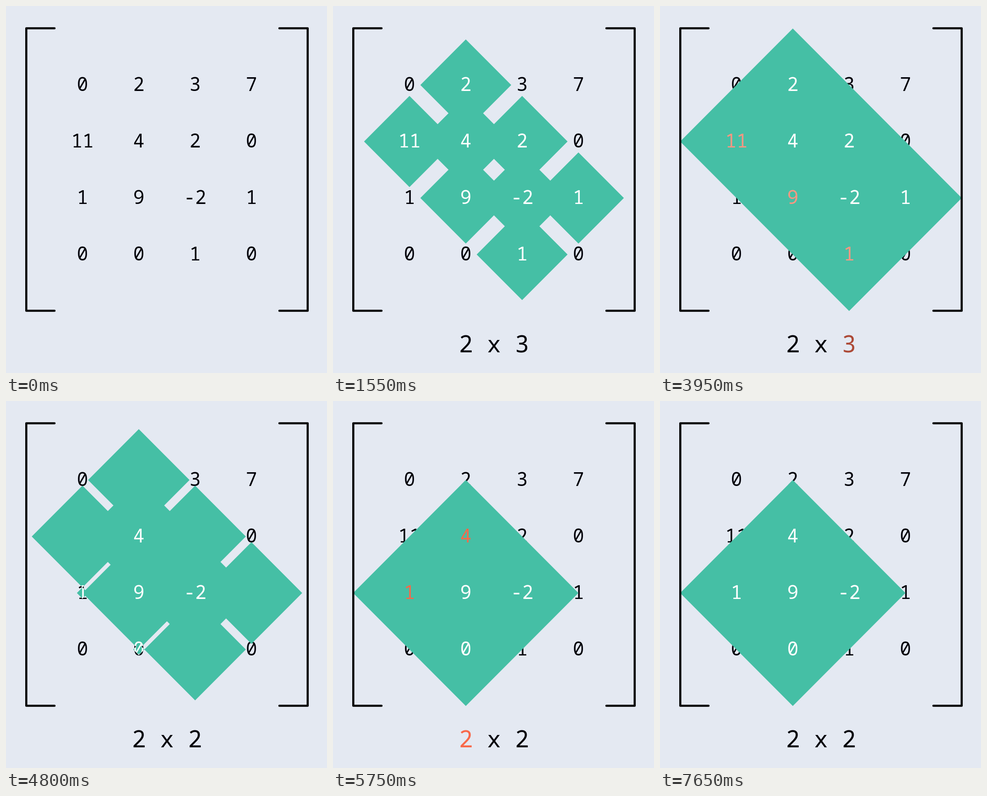
Recreate the animation shown at these times as an HTML page. Size 701x799 px, loop 8000 ms.

```html
<!DOCTYPE html>
<html lang="en">
<head>
<meta charset="utf-8">
<title>Diamond submatrix</title>
<style>
  html, body { margin: 0; width: 100%; height: 100%; overflow: hidden; background: #e4e9f2; }
  svg { display: block; width: 701px; height: 799px; }
  text { font-family: "Noto Sans Mono", "DejaVu Sans Mono", monospace; font-size: 41px; text-anchor: middle; white-space: pre; }
  #label text { font-size: 51px; }
</style>
</head>
<body>
<svg viewBox="0 0 701 799">
  <defs><clipPath id="clip"><path id="clipShape"/></clipPath></defs>
  <g id="base"></g>
  <path id="shape" fill="#45bfa5"/>
  <g id="front" clip-path="url(#clip)"></g>
  <path d="M106 48.5H44.3V663.5H106M597 48.5H658.8V663.5H597" fill="none" stroke="#000" stroke-width="4.6" stroke-linecap="round" stroke-linejoin="round"/>
  <g id="label"></g>
</svg>
<script>
const LOOP = 8000, TICK = 50, STEP = 123;
const BLACK = [0, 0, 8], WHITE = [255, 255, 255], RED = [248, 105, 74];
const matrix = [[0, 2, 3, 7], [11, 4, 2, 0], [1, 9, -2, 1], [0, 0, 1, 0]];

// Cells are indexed row by row, 0 to 15.
const first = [1, 4, 5, 6, 9, 10, 11, 14];
const second = [5, 8, 9, 10, 13];
const GROW = 1105, SWITCH = 4596, MORPH = 700;
const SHOW = 1150, SWAP = 4650;

// Edges of the diamond turn red along with their dimension in the label.
const marks = [
  { cells: [1, 4], part: 0, on: [2010, 130], off: [2910, 220] },
  { cells: [4, 9, 14], part: 2, on: [2910, 220], off: [3910, 130] },
  { cells: [5, 8], part: 0, on: [5670, 75], off: [6560, 180] },
  { cells: [8, 13], part: 2, on: [6560, 180], off: [7510, 130] }
];

const $ = id => document.getElementById(id);
const clamp = v => Math.min(1, Math.max(0, v));
const fade = (t, [start, length]) => clamp((t - start) / length);
const inOut = p => p < 0.5 ? 4 * p ** 3 : 1 - 4 * (1 - p) ** 3;
const mix = (a, b, p) => `rgb(${a.map((v, i) => Math.round(v + (b[i] - v) * p))})`;

function addText(parent, x, y, content, color) {
  const el = document.createElementNS("http://www.w3.org/2000/svg", "text");
  el.setAttribute("x", x);
  el.setAttribute("y", y);
  el.setAttribute("fill", mix(color, color, 0));
  el.textContent = content;
  parent.appendChild(el);
  return el;
}

const cells = matrix.flat().map((value, i) => {
  const x = 167 + STEP * (i % 4), y = 172 + STEP * Math.floor(i / 4);
  addText($("base"), x, y + 12.7, value, BLACK);
  const front = addText($("front"), x, y + 12.7, value, WHITE);
  return { x, y, front, a: +first.includes(i), b: +second.includes(i) };
});
const label = ["2", "x", "3"].map((s, i) => addText($("label"), 290.3 + 61.2 * i, 754, s, BLACK));

const diamond = (x, y, r) => `M${x} ${y - r}L${x + r} ${y}L${x} ${y + r}L${x - r} ${y}Z`;
const redness = (t, hit) => clamp(marks.filter(hit)
  .reduce((sum, m) => sum + fade(t, m.on) - fade(t, m.off), 0));

function draw(t) {
  const grow = inOut(fade(t, [GROW, MORPH]));
  const turn = inOut(fade(t, [SWITCH, MORPH]));
  const swapped = t >= SWAP;
  let d = "";
  cells.forEach((c, i) => {
    const scale = c.a * grow * (1 - turn) + c.b * turn;
    if (scale > 0) d += diamond(c.x, c.y, STEP * scale);
    c.front.style.display = (swapped ? c.b : c.a) && t >= SHOW ? "" : "none";
    c.front.setAttribute("fill", mix(WHITE, RED, redness(t, m => m.cells.includes(i))));
  });
  $("shape").setAttribute("d", d);
  $("clipShape").setAttribute("d", d);
  $("label").style.display = t >= SHOW ? "" : "none";
  label[2].textContent = swapped ? "2" : "3";
  label.forEach((el, i) => el.setAttribute("fill", mix(BLACK, RED, redness(t, m => m.part === i))));
}

const begin = performance.now();
function frame() {
  const t = (performance.now() - begin) % LOOP;
  draw(Math.floor(t / TICK) * TICK);
  requestAnimationFrame(frame);
}
draw(0);
requestAnimationFrame(frame);
</script>
</body>
</html>
```
